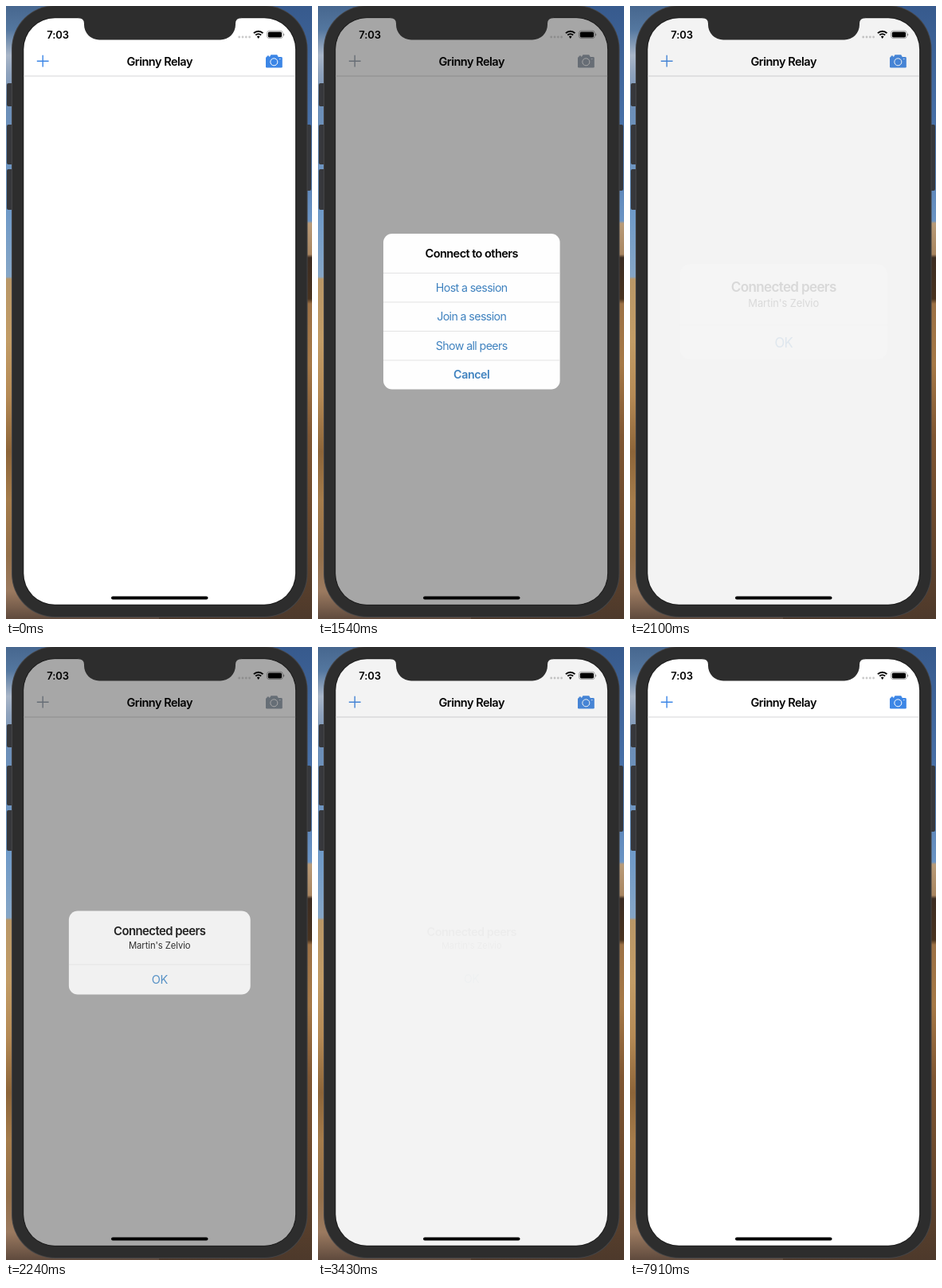
An HTML page with a canvas for the animation above (8000 ms loop, 384 by 770 pixels).

```html
<!DOCTYPE html>
<html lang="en">
<head>
<meta charset="utf-8">
<title>Phone alerts</title>
<style>
  html, body { margin: 0; width: 100%; height: 100%; overflow: hidden; background: #2d2d2d; }
  canvas { display: block; width: 384px; height: 770px; }
</style>
</head>
<body>
<canvas id="stage"></canvas>
<script>
const W = 384, H = 770, LOOP = 8000, STEP = 70;
const DIM = 0.4, MID = 192.7;
const BODY = '#2d2d2d', LINK = '#3f82bf';
const canvas = document.getElementById('stage');
const ratio = window.devicePixelRatio || 1;
canvas.width = W * ratio;
canvas.height = H * ratio;
const ctx = canvas.getContext('2d');

const alerts = [
  {
    show: 300, press: 1370, hide: 1510, top: 286, bottom: 481.5,
    title: 'Connect to others', titleY: 315.5, pressed: 2,
    rows: ['Host a session', 'Join a session', 'Show all peers', 'Cancel'],
    lines: [335.5, 372, 408.5, 445]
  },
  {
    show: 2071, press: 3080, hide: 3250, top: 333, bottom: 435,
    title: 'Connected peers', titleY: 362.5, pressed: 0,
    note: "Martin's Zelvio", noteY: 379,
    rows: ['OK'], lines: [398.5]
  }
];

const clamp = v => Math.max(0, Math.min(1, v));
const mix = (a, b, k) => a.map((v, i) => Math.round(v + (b[i] - v) * k));
const rgb = c => `rgb(${c.join(',')})`;

// Remaining distance of a critically damped spring, ms after its start
function spring(ms) {
  if (ms <= 0) return 1;
  const x = ms * 0.0204;
  const rest = (1 + x) * Math.exp(-x);
  return rest < 0.004 ? 0 : rest;
}

function pill(x, y, w, h, r, color) {
  ctx.fillStyle = color;
  ctx.beginPath();
  ctx.roundRect(x, y, w, h, r);
  ctx.fill();
}

function disc(x, y, r, color) {
  ctx.fillStyle = color;
  ctx.beginPath();
  ctx.arc(x, y, r, 0, Math.PI * 2);
  ctx.fill();
}

function label(str, x, y, size, weight, color, spacing = 0) {
  ctx.font = `${weight} ${size}px Inter, sans-serif`;
  ctx.letterSpacing = spacing + 'px';
  ctx.textAlign = 'center';
  ctx.fillStyle = color;
  ctx.fillText(str, x, y);
}

function strip(x, w, stops) {
  const g = ctx.createLinearGradient(0, 0, 0, H);
  for (const [y, color] of stops) g.addColorStop(y / H, color);
  ctx.fillStyle = g;
  ctx.fillRect(x, 0, w, H);
}

function wallpaper() {
  strip(0, W / 2, [
    [0, '#47678f'], [30, '#54779f'], [62, '#a9b6c8'], [85, '#8ea2bc'],
    [130, '#6c8fb8'], [260, '#6f9ac8'], [340, '#86a6c6'], [343, '#b99767'],
    [420, '#c29c66'], [490, '#b58a55'], [560, '#8d6539'], [620, '#a57c4b'],
    [690, '#94704a'], [735, '#9b7a60'], [770, '#5f4a3d']
  ]);
  strip(W / 2, W / 2, [
    [0, '#375a8d'], [140, '#476fa6'], [270, '#6b94c4'], [273, '#b99b78'],
    [312, '#a98661'], [316, '#3c2c22'], [368, '#49331f'], [374, '#9c7145'],
    [450, '#a67947'], [540, '#805733'], [640, '#6d4a2d'], [770, '#4d392b']
  ]);
}

function phone() {
  for (const [y, h] of [[97, 29], [149, 50], [205, 51]]) pill(1, y, 8, h, 2, '#37383c');
  pill(376, 149, 7, 83, 2, '#37383c');
  pill(7, -1, 371.5, 769, 55, '#454547');
  pill(8, 0, 369.5, 767, 54, BODY);
}

function notch() {
  ctx.fillStyle = BODY;
  ctx.beginPath();
  ctx.moveTo(90, 14);
  ctx.lineTo(90, 15);
  ctx.quadraticCurveTo(98, 15, 98, 22);
  ctx.arcTo(98, 42.5, 118, 42.5, 19);
  ctx.lineTo(268, 42.5);
  ctx.arcTo(288, 42.5, 288, 22, 19);
  ctx.lineTo(288, 22);
  ctx.quadraticCurveTo(288, 15, 296, 15);
  ctx.lineTo(296, 14);
  ctx.fill();
}

function statusBar(k) {
  label('7:03', 65, 40.6, 13, 600, '#000', -0.1);
  const dot = rgb(mix([202, 202, 202], [132, 132, 132], k));
  for (let i = 0; i < 4; i++) disc(292.7 + i * 4.3, 39, 1.4, dot);

  ctx.strokeStyle = '#000';
  ctx.lineWidth = 2;
  const up = -Math.PI / 2, spread = 0.76;
  for (const r of [8.4, 5]) {
    ctx.beginPath();
    ctx.arc(316.7, 40.2, r, up - spread, up + spread);
    ctx.stroke();
  }
  ctx.fillStyle = '#000';
  ctx.beginPath();
  ctx.moveTo(316.7, 41);
  ctx.arc(316.7, 40.2, 2.6, up - spread, up + spread);
  ctx.fill();

  ctx.strokeStyle = 'rgba(0,0,0,0.4)';
  ctx.lineWidth = 0.8;
  ctx.beginPath();
  ctx.roundRect(327.6, 31.2, 19.6, 9.4, 2.6);
  ctx.stroke();
  pill(328.8, 32.4, 17.2, 7, 1.6, '#000');
  pill(348, 34.4, 1.2, 3, 0.6, 'rgba(0,0,0,0.4)');
}

function navBar(t, k) {
  ctx.fillStyle = '#d6d6d8';
  ctx.fillRect(22, 87.5, 342, 1);

  const tint = rgb(mix([60, 134, 230], [172, 172, 172], k));
  ctx.save();
  ctx.globalAlpha = t >= 140 && t < 300 ? 0.4 : 1;
  ctx.strokeStyle = tint;
  ctx.lineWidth = 1.4;
  ctx.beginPath();
  ctx.moveTo(38.8, 69.2);
  ctx.lineTo(53.6, 69.2);
  ctx.moveTo(46.2, 61.8);
  ctx.lineTo(46.2, 76.6);
  ctx.stroke();
  ctx.restore();

  pill(326, 64, 20.8, 13.6, 1.4, tint);
  pill(327.4, 62.4, 3, 3, 0.6, tint);
  ctx.beginPath();
  ctx.moveTo(330.6, 64.4);
  ctx.lineTo(332.4, 61.3);
  ctx.lineTo(340.2, 61.3);
  ctx.lineTo(342, 64.4);
  ctx.fill();
  ctx.strokeStyle = '#fff';
  ctx.lineWidth = 1;
  ctx.beginPath();
  ctx.arc(336.3, 70.3, 4.5, 0, Math.PI * 2);
  ctx.stroke();
  disc(343.8, 66.6, 0.7, '#fff');

  label('Grinny Relay', MID, 74.7, 14.5, 600, '#000', -0.5);
}

function drawAlert(a, t, alpha, scale) {
  const left = 82, width = 221.6, cy = (a.top + a.bottom) / 2;
  ctx.save();
  ctx.globalAlpha = alpha;
  ctx.translate(MID, cy);
  ctx.scale(scale, scale);
  ctx.translate(-MID, -cy);
  pill(left, a.top, width, a.bottom - a.top, 11, '#fefefe');
  ctx.beginPath();
  ctx.roundRect(left, a.top, width, a.bottom - a.top, 11);
  ctx.clip();

  label(a.title, MID, a.titleY, 14.5, 600, '#000', -0.55);
  if (a.note) label(a.note, MID, a.noteY, 11, 400, '#111', -0.1);
  a.rows.forEach((row, i) => {
    const y = a.lines[i], end = a.lines[i + 1] || a.bottom;
    if (i === a.pressed && t >= a.press && t < a.hide - 20) {
      ctx.fillStyle = '#ebebeb';
      ctx.fillRect(left, y, width, end - y);
    }
    ctx.fillStyle = '#e3e3e4';
    ctx.fillRect(left, y - 0.5, width, 1);
    const bold = row === 'Cancel';
    label(row, MID, (y + end) / 2 + 5.2, 14.2, bold ? 600 : 400, LINK, bold ? -0.4 : -0.6);
  });
  ctx.restore();
}

function draw(t) {
  // k: how far the dimming has come; alpha and scale pose the alert
  const poses = alerts.map(a => {
    if (t < a.show) return { k: 0, alpha: 0, scale: 1 };
    const rest = t < a.hide ? spring(t - a.show) : spring(t - a.hide);
    return t < a.hide
      ? { k: 1 - rest, alpha: 1 - rest, scale: 1 + 0.2 * rest }
      : { k: rest, alpha: clamp((rest - 0.1) * 1.5), scale: 1 };
  });
  const k = Math.max(...poses.map(p => p.k));

  ctx.setTransform(ratio, 0, 0, ratio, 0, 0);
  wallpaper();
  phone();

  pill(21.2, 14.2, 343, 738.6, 40, '#1c1c1c');
  ctx.save();
  ctx.beginPath();
  ctx.roundRect(22.3, 15.3, 340.8, 736.5, 39);
  ctx.clip();
  ctx.fillStyle = '#fff';
  ctx.fillRect(22, 15, 342, 738);
  navBar(t, k);
  ctx.fillStyle = `rgba(0,0,0,${DIM * k})`;
  ctx.fillRect(22, 15, 342, 738);
  alerts.forEach((a, i) => {
    const p = poses[i];
    if (p.alpha > 0) drawAlert(a, t, p.alpha, p.scale);
  });
  statusBar(k);
  pill(132, 741.4, 121.5, 4, 2, '#000');
  ctx.restore();
  notch();
}

const start = performance.now();
function tick() {
  const t = (performance.now() - start) % LOOP;
  draw(Math.floor(t / STEP) * STEP);
  requestAnimationFrame(tick);
}
tick();
</script>
</body>
</html>
```
